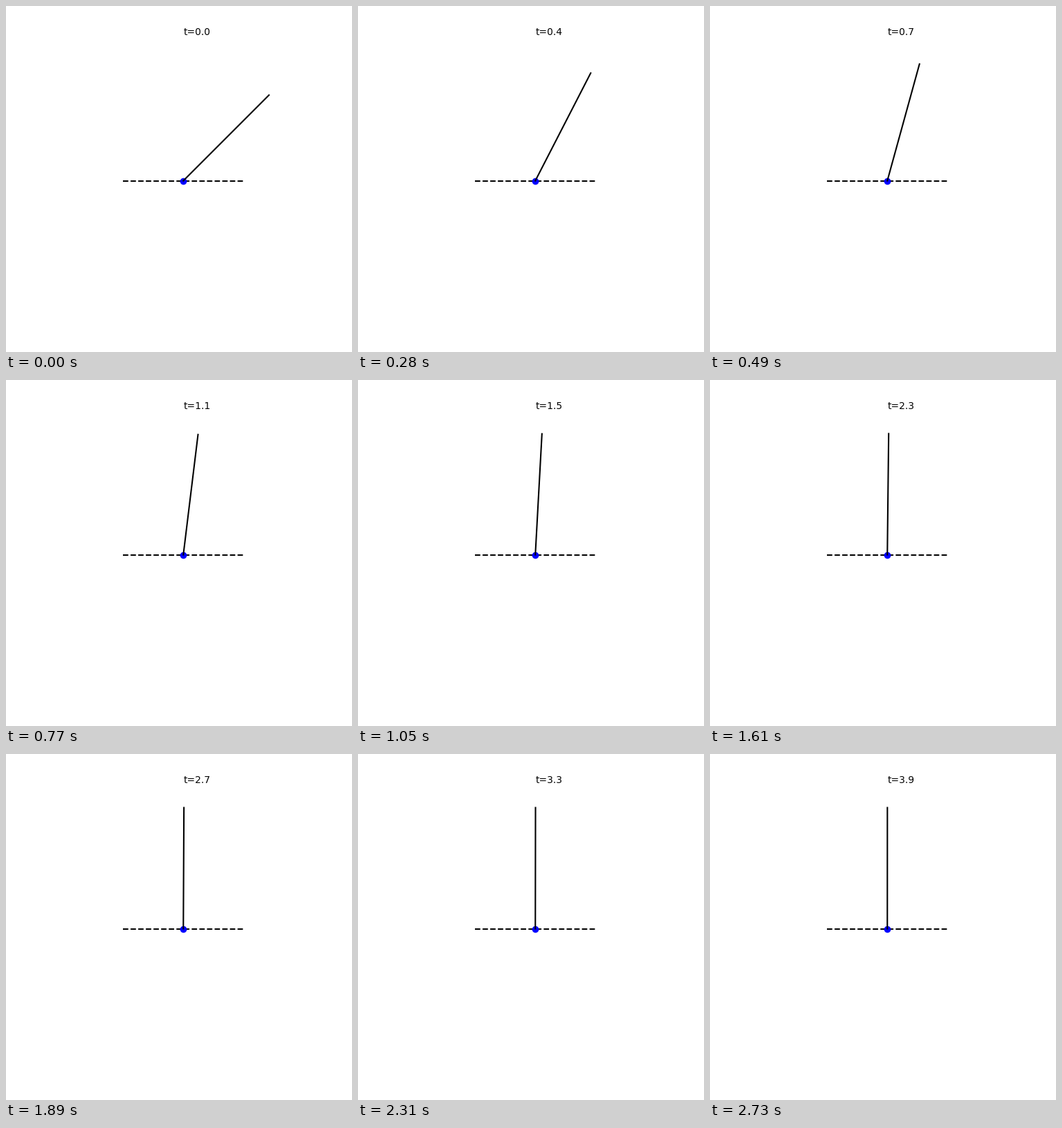
Recreate the animation shown at these times as a matplotlib script. Size 500 by 500 pixels, loop 2.8 s.

```python
import numpy as np
import matplotlib.pyplot as plt
from matplotlib.animation import FuncAnimation

FRAMES = 40
INTERVAL = 70  # ms
DT = 0.1
START = np.pi / 4
SLOW, FAST = 2.0, 7.0  # decay rates of the overdamped return to upright


def tilt(t):
    """Angle from the vertical, released at rest from START."""
    mix = FAST * np.exp(-SLOW * t) - SLOW * np.exp(-FAST * t)
    return START * mix / (FAST - SLOW)


fig, ax = plt.subplots(figsize=(5, 5), dpi=100)
ax.set_aspect("equal")
ax.set_xlim(-1.1, 1.1)
ax.set_ylim(-1.1, 1.1)
ax.axis("off")

ax.plot([-0.5, 0.5], [0, 0], "k--", lw=1.5)
ax.plot([0], [0], "bo", ms=6)
rod, = ax.plot([], [], "k-", lw=1.5)
clock = ax.text(0, 1.2, "", fontsize=10, family="DejaVu Sans")


def update(i):
    t = i * DT
    angle = tilt(t)
    rod.set_data([0, np.sin(angle)], [0, np.cos(angle)])
    clock.set_text(f"t={t:.1f}")
    return rod, clock


anim = FuncAnimation(fig, update, frames=FRAMES, interval=INTERVAL,
                     init_func=lambda: update(0), repeat=True)
plt.show()
```
